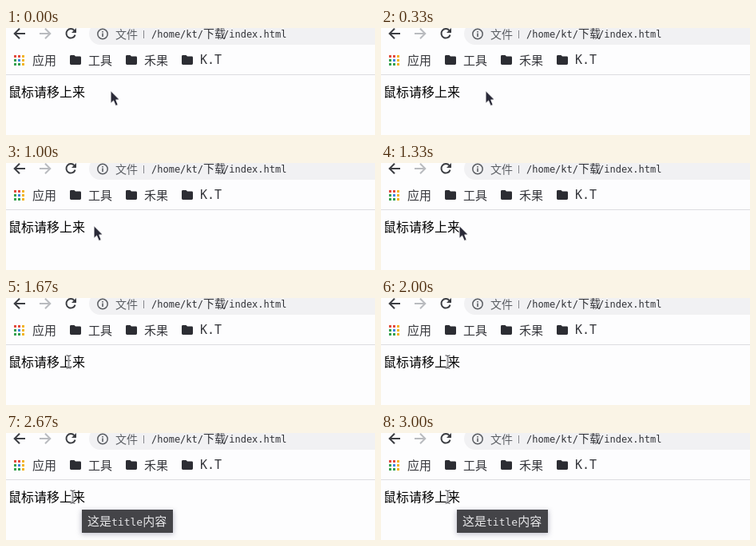
An HTML page that plays this animation: 462x134 px, repeating every 3330 ms.

```html
<!DOCTYPE html>
<html lang="zh-CN">
<head>
<meta charset="utf-8">
<title>title</title>
<style>
html, body { margin: 0; width: 100%; height: 100%; overflow: hidden; background: #fdfdfe; }
svg { display: block; width: 462px; height: 134px; }
text { font-family: "Noto Sans CJK SC", "Noto Sans CJK", sans-serif; white-space: pre; }
.mono { font-family: "DejaVu Sans Mono", "Noto Sans Mono", monospace; font-size: 13px; }
.url { font-size: 14px; fill: #303136; }
.url .mono { font-size: 12px; }
.mark { font-size: 15px; fill: #36373c; }
.page { font-size: 16px; fill: #000; }
.tip { font-size: 15px; fill: #e6e6e8; }
.line { fill: none; stroke: #3c3e43; stroke-width: 2; }
.off { stroke: #b9bbbf; }

#arrow, #beam, #tip { animation: 3.33s step-end infinite; }
#arrow { animation-name: arrow; }
#beam { animation-name: beam; }
#tip { animation-name: tip; }

/* Steps at 1000, 1330, 1670, 2000 and 2330 ms */
@keyframes arrow {
  0% { transform: translate(131px, 78.5px); visibility: visible; }
  30.03% { transform: translate(110px, 78.5px); visibility: visible; }
  39.94% { transform: translate(98px, 78.5px); visibility: visible; }
  50.15%, 100% { transform: translate(98px, 78.5px); visibility: hidden; }
}
@keyframes beam {
  0% { transform: translate(78.5px, 80px); visibility: hidden; }
  50.15% { transform: translate(78.5px, 80px); visibility: visible; }
  60.06%, 100% { transform: translate(83.5px, 80px); visibility: visible; }
}
@keyframes tip {
  0% { visibility: hidden; }
  69.97%, 100% { visibility: visible; }
}
</style>
</head>
<body>
<svg viewBox="0 0 462 134">
  <defs>
    <path id="folder" d="M1.5 0H5.5L7 1.6H12.5Q14 1.6 14 3V10.6Q14 12 12.5 12H1.5Q0 12 0 10.6V1.4Q0 0 1.5 0Z" fill="#2c2d33"/>
    <path id="bar" d="M-3 -8H-1L0 -7L1 -8H3M0 -7V7M-3 8H-1L0 7L1 8H3" fill="none"/>
    <filter id="blur" x="-20%" y="-50%" width="140%" height="200%"><feGaussianBlur stdDeviation="3"/></filter>
  </defs>

  <!-- Toolbar -->
  <path class="line" d="M24 7H11M17 .7L10.7 7L17 13.3"/>
  <path class="line off" d="M42 7H55M49 .7L55.3 7L49 13.3"/>
  <path class="line" d="M85.6 3.2A5.7 5.7 0 1 0 86.6 8.6"/>
  <path d="M88 0V6H82Z" fill="#3c3e43"/>
  <rect x="104" y="-7" width="400" height="28" rx="14" fill="#f1f1f3"/>
  <circle cx="121" cy="7.5" r="6.2" fill="none" stroke="#5b5e63" stroke-width="1.5"/>
  <path d="M121 6.6V11M121 3.9V5.4" stroke="#5b5e63" stroke-width="1.6"/>
  <text class="url" x="137" y="12.5" style="fill:#5b5e63">文件</text>
  <path d="M172.5 3V13" stroke="#85878c"/>
  <text class="url" x="182" y="12"><tspan class="mono">/home/kt/</tspan>下载<tspan class="mono" x="272">/index.html</tspan></text>

  <!-- Bookmarks -->
  <g id="apps"></g>
  <text class="mark" x="33" y="45.5">应用</text>
  <use href="#folder" x="80" y="34"/>
  <text class="mark" x="103" y="45.5">工具</text>
  <use href="#folder" x="150" y="34"/>
  <text class="mark" x="173" y="45.5">禾果</text>
  <use href="#folder" x="220" y="34"/>
  <text class="mark mono" x="243" y="45">K.T</text>
  <path d="M0 58.5H462" stroke="#dcdde0"/>

  <!-- Page -->
  <text class="page" x="3" y="86">鼠标请移上来</text>
  <g id="tip">
    <rect x="94" y="97" width="116" height="30" fill="#70708a" opacity=".4" filter="url(#blur)"/>
    <rect x="95" y="96" width="114" height="29" fill="#444448"/>
    <text class="tip" x="102" y="116">这是<tspan class="mono">title</tspan>内容</text>
  </g>
  <path id="arrow" d="M0 0V16L3.6 12.7L6.3 19L9.3 17.7L6.7 11.6H11.4Z" fill="#2a2a38" stroke="#fff"/>
  <g id="beam">
    <use href="#bar" stroke="#fff" stroke-width="2.6"/>
    <use href="#bar" stroke="#38383e"/>
  </g>
</svg>
<script>
const red = '#e34a3c', green = '#34a04e', blue = '#4285e4', yellow = '#f2b422';
const colors = [red, red, yellow, green, blue, yellow, green, green, yellow];
document.getElementById('apps').innerHTML = colors.map((color, i) =>
  `<rect x="${10 + i % 3 * 5}" y="${34 + Math.floor(i / 3) * 5}" width="3" height="3" fill="${color}"/>`
).join('');
</script>
</body>
</html>
```
